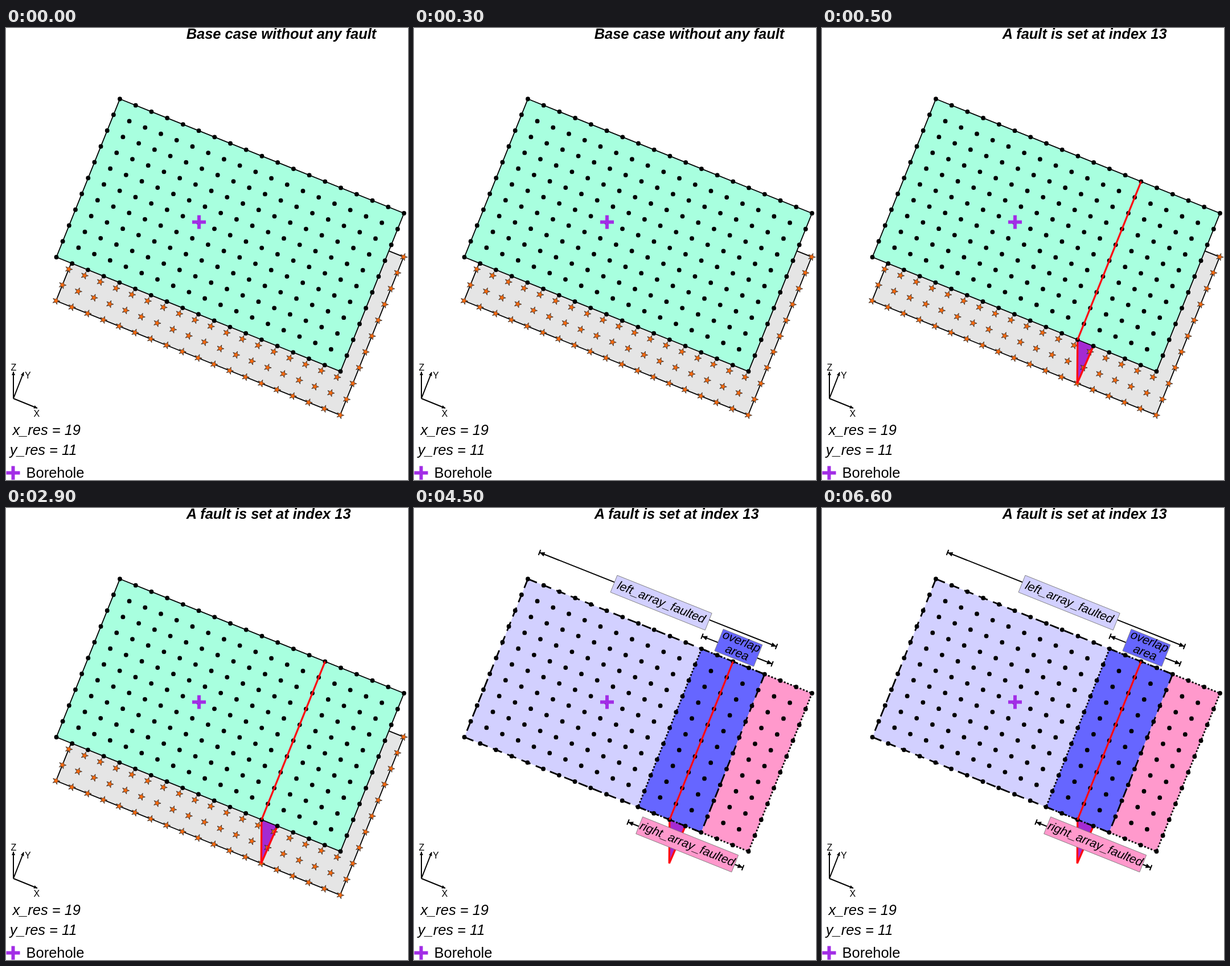
An HTML page that plays this animation: 706 px wide and 793 px high, repeating every 8000 ms.

```html
<!DOCTYPE html>
<html lang="en">
<head>
<meta charset="utf-8">
<title>Fault grid</title>
<style>
  html, body { margin: 0; width: 100%; height: 100%; overflow: hidden; background: #fff; }
  svg { display: block; width: 100vw; height: 100vh; }
  text { font-family: "Liberation Sans", Arial, sans-serif; font-size: 25.45px; }
  .title { font-weight: bold; font-style: italic; }
  .italic { font-style: italic; }
  .axis { font-size: 16px; }
  .label { font-size: 21.3px; font-style: italic; text-anchor: middle; }
</style>
</head>
<body>
<svg id="stage" viewBox="0 0 706 793"></svg>
<script>
const stage = document.getElementById('stage');
const NX = 19, NY = 11, FAULT = 13;
const UPPER = [200, 124.5], LOWER = [199.4, 201.1];
const TILT = 21.8;
const PURPLE = '#a22de6', RED = '#ff0a12';

function add(parent, tag, attrs = {}, text) {
  const el = document.createElementNS('http://www.w3.org/2000/svg', tag);
  for (const k in attrs) el.setAttribute(k, attrs[k]);
  if (text) el.textContent = text;
  parent.appendChild(el);
  return el;
}
const group = (attrs) => add(stage, 'g', attrs);

// Grid node (i, j) of the sheet whose first corner is given.
const node = (i, j, [x, y] = UPPER) =>
  [x + 27.72 * i - 11.15 * j, y + 11.14 * i + 27.75 * j];

const join = pts => pts.map(p => p.map(n => n.toFixed(2)).join()).join(' ');
const poly = (g, pts, attrs) => add(g, 'polygon', { points: join(pts), ...attrs });
const line = (g, pts, attrs) =>
  add(g, 'polyline', { points: join(pts), fill: 'none', stroke: '#000', 'stroke-width': 2, ...attrs });
const sheet = (a, b, corner) =>
  [node(a, 0, corner), node(b, 0, corner), node(b, NY - 1, corner), node(a, NY - 1, corner)];

function star(g, [x, y]) {
  const pts = Array.from({ length: 10 }, (_, k) => {
    const r = k % 2 ? 2.6 : 6.7, a = (k * 36 - 90 + TILT) * Math.PI / 180;
    return [x + r * Math.cos(a), y + r * Math.sin(a)];
  });
  poly(g, pts, { fill: '#ff6a0d', stroke: '#222', 'stroke-width': 0.8 });
}

function plus(g, x, y) {
  add(g, 'path', { d: `M${x - 12} ${y}h24M${x} ${y - 12}v24`, stroke: PURPLE, 'stroke-width': 6 });
}

function arrowHead(g, x, y, angle, len, half) {
  add(g, 'path', {
    d: `M0 0L${-len} ${-half}V${half}Z`,
    transform: `translate(${x} ${y}) rotate(${angle})`
  });
}

function axis(x, y) {
  line(axes, [[13, 650], [x, y]]);
  arrowHead(axes, x, y, Math.atan2(y - 650, x - 13) * 180 / Math.PI, 6, 3);
}

// Dimension line with an arrow and a stop bar at both ends.
function span(g, x1, y1, x2, y2) {
  const angle = Math.atan2(y2 - y1, x2 - x1) * 180 / Math.PI;
  line(g, [[x1, y1], [x2, y2]]);
  for (const [x, y, a] of [[x1, y1, angle + 180], [x2, y2, angle]]) {
    arrowHead(g, x, y, a, 9, 4);
    add(g, 'path', {
      d: 'M0 -5V5', stroke: '#000', 'stroke-width': 2,
      transform: `translate(${x} ${y}) rotate(${a})`
    });
  }
}

function label(g, x, y, w, h, fill, rows) {
  const box = add(g, 'g', { transform: `translate(${x} ${y}) rotate(${TILT})` });
  add(box, 'rect', {
    x: -w / 2, y: -h / 2, width: w, height: h,
    fill, stroke: '#777', 'stroke-width': 0.8
  });
  for (const [text, dx, dy] of rows) add(box, 'text', { class: 'label', x: dx, y: dy }, text);
}

// Lower sheet
const lower = group();
poly(lower, sheet(0, NX - 1, LOWER), { fill: '#e5e5e5', stroke: '#000', 'stroke-width': 1.8 });

const wedge = group();
const top13 = node(FAULT, NY - 1), low13 = node(FAULT, NY - 1, LOWER), top14 = node(FAULT + 1, NY - 1);
poly(wedge, [top13, top14, low13], { fill: '#a42ad2' });

const stars = group();
for (let j = 0; j < NY; j++)
  for (let i = 0; i < NX; i++)
    if (j > 7 || i === NX - 1) star(stars, node(i, j, LOWER));

const wedgeEdge = group();
line(wedgeEdge, [top13, low13, top14], { stroke: RED, 'stroke-width': 3.4 });

// Upper sheet, whole or split
const whole = group();
poly(whole, sheet(0, NX - 1), { fill: '#a8ffdf', stroke: '#000', 'stroke-width': 1.8 });

const split = group();
for (const [a, b, fill] of [[0, 11, '#d2d0ff'], [11, 15, '#6666ff'], [15, 18, '#ff99cc']])
  poly(split, sheet(a, b), { fill });
for (const [a, b, dash] of [[0, 15, '17 10'], [11, 18, '3 3']]) {
  const [p, q, r, s] = sheet(a, b);
  for (const side of [[p, q], [s, r], [p, s], [q, r]])
    line(split, side, { 'stroke-width': 2.8, 'stroke-dasharray': dash });
}

const dots = group();
for (let j = 0; j < NY; j++)
  for (let i = 0; i < NX; i++) {
    const [cx, cy] = node(i, j);
    add(dots, 'circle', { cx, cy, r: 3.9 });
  }

const fault = group();
line(fault, [node(FAULT, 0), top13], { stroke: RED, 'stroke-width': 3.2 });

const notes = group();
span(notes, 220.5, 78, 636.5, 243);
span(notes, 506, 225, 629, 273.5);
span(notes, 376, 551, 577.5, 631);
label(notes, 434.1, 166.2, 179, 32, '#d2d0ff', [['left_array_faulted', 0, 6]]);
label(notes, 569.9, 245.3, 74, 41, '#6666ff', [['overlap', 1, -5.5], ['area', 1, 15.5]]);
label(notes, 479.7, 590.3, 181, 32, '#ff99cc', [['right_array_faulted', 0, 6]]);

// Legend and axes
const axes = group();
axis(13, 603);
axis(31, 604);
axis(55, 667);
for (const [name, x, y] of [['Z', 8.5, 601], ['Y', 33, 615], ['X', 48.5, 682]])
  add(axes, 'text', { class: 'axis', x, y }, name);

const legend = group();
plus(legend, 339, 340.5);
plus(legend, 12.5, 780.5);
add(legend, 'text', { class: 'italic', x: 11.5, y: 714 }, 'x_res = 19');
add(legend, 'text', { class: 'italic', x: 6.8, y: 749 }, 'y_res = 11');
add(legend, 'text', { x: 35.6, y: 789 }, 'Borehole');
const title = add(legend, 'text', { class: 'title', x: 316.7, y: 19 });

const show = (el, on) => el.setAttribute('visibility', on ? 'visible' : 'hidden');

function draw(t) {
  const faulted = t >= 500, parted = t >= 4500;
  title.textContent = faulted ? 'A fault is set at index 13' : 'Base case without any fault';
  for (const g of [wedge, wedgeEdge, fault]) show(g, faulted);
  for (const g of [lower, stars, whole]) show(g, !parted);
  for (const g of [split, notes]) show(g, parted);
}

const start = performance.now();
function tick() {
  draw((performance.now() - start) % 8000);
  requestAnimationFrame(tick);
}
tick();
</script>
</body>
</html>
```
